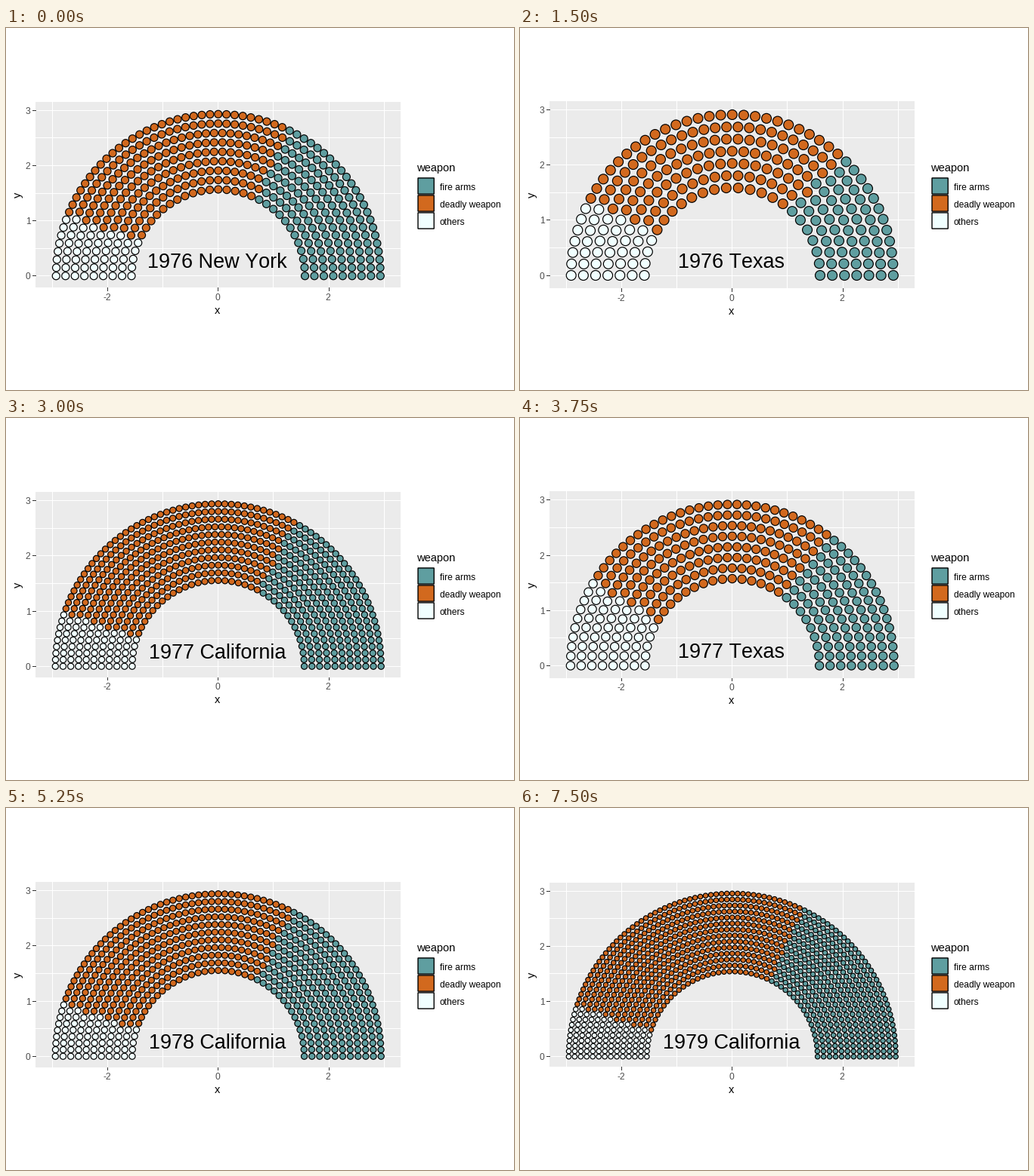
Animation of 672x480 px, one loop 8000 ms. Source, as a matplotlib script:

```python
import numpy as np
import matplotlib.pyplot as plt
from matplotlib.animation import FuncAnimation
from matplotlib.collections import EllipseCollection
from matplotlib.patches import Rectangle

W, H, DPI = 672, 480, 100
PX = 72 / DPI                      # points per pixel
UNIT = 73.17                       # pixels per data unit
CX, CY = 280.25, 221.0             # panel centre
LEFT, RIGHT = 39, 522
R_IN, R_OUT = 1.5, 3.0
TEAL, ORANGE, AZURE = "#5F9EA0", "#D2691E", "#F0FFFF"
GREY = "#4D4D4D"
SMALL, NORMAL, LARGE = 12, 14.67, 27

# label, rows, dots in inner row, dots in outer row,
# angle filled by fire arms from the right, by others from the left
SCENES = [
    ("1976 New York", 9, 33, 63, 64.5, 22.7),
    ("1976 California", 10, 37, 70, 63.0, 20.0),
    ("1976 Texas", 7, 24, 45, 47.8, 27.8),
    ("1977 New York", 13, 48, 93, 49.3, 12.8),
    ("1977 California", 11, 41, 79, 62.0, 19.0),
    ("1977 Texas", 8, 29, 54, 51.8, 31.3),
    ("1978 New York", 12, 44, 87, 57.5, 11.5),
    ("1978 California", 11, 41, 79, 63.0, 18.5),
    ("1978 Texas", 9, 28, 56, 46.2, 25.2),
    ("1979 New York", 14, 51, 100, 58.0, 12.0),
    ("1979 California", 14, 50, 97, 64.2, 17.7),
]
STEP, HOLD, FRAMES = 250, 3, 32

plt.rcParams["font.family"] = "Liberation Sans"
plt.rcParams["text.kerning_factor"] = 6
fig = plt.figure(figsize=(W / DPI, H / DPI), dpi=DPI, facecolor="white")
ax = fig.add_axes([0, 0, 1, 1])


def text(x, y, s, size, color="black", **kw):
    kw.setdefault("va", "baseline")
    ax.text(x, y, s, fontsize=size * PX, color=color, **kw)


def line(x, y, color):
    ax.plot(x, y, color=color, lw=PX, antialiased=False,
            solid_capstyle="butt", zorder=1)


def box(x, y, w, h, fill, **kw):
    ax.add_patch(Rectangle((x, y), w, h, facecolor=fill, zorder=0.5, **kw))


def draw_panel(top, bottom, zero):
    box(LEFT, top, RIGHT - LEFT, bottom - top, "#EBEBEB", antialiased=False)
    for v in range(-3, 4):
        x = CX + v * UNIT
        line([x, x], [top, bottom], "white")
        if v % 2 == 0:
            line([x, x], [bottom, bottom + 3.7], "#333333")
            text(x - 0.5, bottom + 16.6, str(v), SMALL, GREY, ha="center")
    for k in range(7):
        y = zero - k / 2 * UNIT
        line([LEFT, RIGHT], [y, y], "white")
        if k % 2 == 0:
            line([LEFT - 3.7, LEFT], [y, y], "#333333")
            text(32.5, y + 5, str(k // 2), SMALL, GREY, ha="right")
    text(CX - 0.5, bottom + 34.5, "x", NORMAL, ha="center")
    text(16, CY, "y", NORMAL, ha="center", va="center", rotation=90)


def draw_legend():
    text(543.5, 190, "weapon", NORMAL)
    entries = (("fire arms", TEAL), ("deadly weapon", ORANGE), ("others", AZURE))
    for k, (name, color) in enumerate(entries):
        y = 198.9 + 23 * k
        box(545, y, 21.2, 21.2, color, edgecolor="black", lw=1.4 * PX,
            snap=False)
        text(574, y + 16, name, SMALL)


def draw_dots(rows, inner, outer, gap, rad, zero, arms, others):
    counts = np.floor(np.linspace(inner, outer, rows) + 0.5).astype(int)
    pos, fills = [], []
    for i, n in enumerate(counts):
        r = (R_IN + rad + gap * i) * UNIT
        for deg in np.linspace(0, 180, n):
            t = np.radians(deg)
            # dots sit on pixel centres, half a pixel from the grid
            pos.append((CX + 0.5 + r * np.cos(t), zero + 0.5 - r * np.sin(t)))
            fills.append(TEAL if deg <= arms else
                         AZURE if 180 - deg <= others else ORANGE)
    d = np.full(len(pos), 2 * rad * UNIT)
    ax.add_collection(EllipseCollection(
        d, d, np.zeros(len(pos)), units="xy", offsets=pos,
        offset_transform=ax.transData, facecolors=fills, edgecolors="black",
        linewidths=1.2 * PX, antialiaseds=True, snap=False, zorder=2),
        autolim=False)


def draw(frame):
    label, rows, inner, outer, arms, others = SCENES[frame // HOLD]
    gap = (R_OUT - R_IN) / (rows - 0.2)
    rad = 0.4 * gap
    half = 0.55 * (R_OUT + rad) * UNIT
    zero = CY + (R_OUT - rad) / 2 * UNIT

    ax.clear()
    ax.set_xlim(0, W)
    ax.set_ylim(H, 0)
    ax.set_autoscale_on(False)
    ax.axis("off")
    draw_panel(CY - half, CY + half - 0.2, zero)
    draw_dots(rows, inner, outer, gap, rad, zero, arms, others)
    text(CX - 0.5, zero - 10, label, LARGE, ha="center", zorder=3)
    draw_legend()
    return ()


anim = FuncAnimation(fig, draw, frames=FRAMES, interval=STEP,
                     init_func=lambda: (), repeat=True, repeat_delay=0)
plt.show()
```
